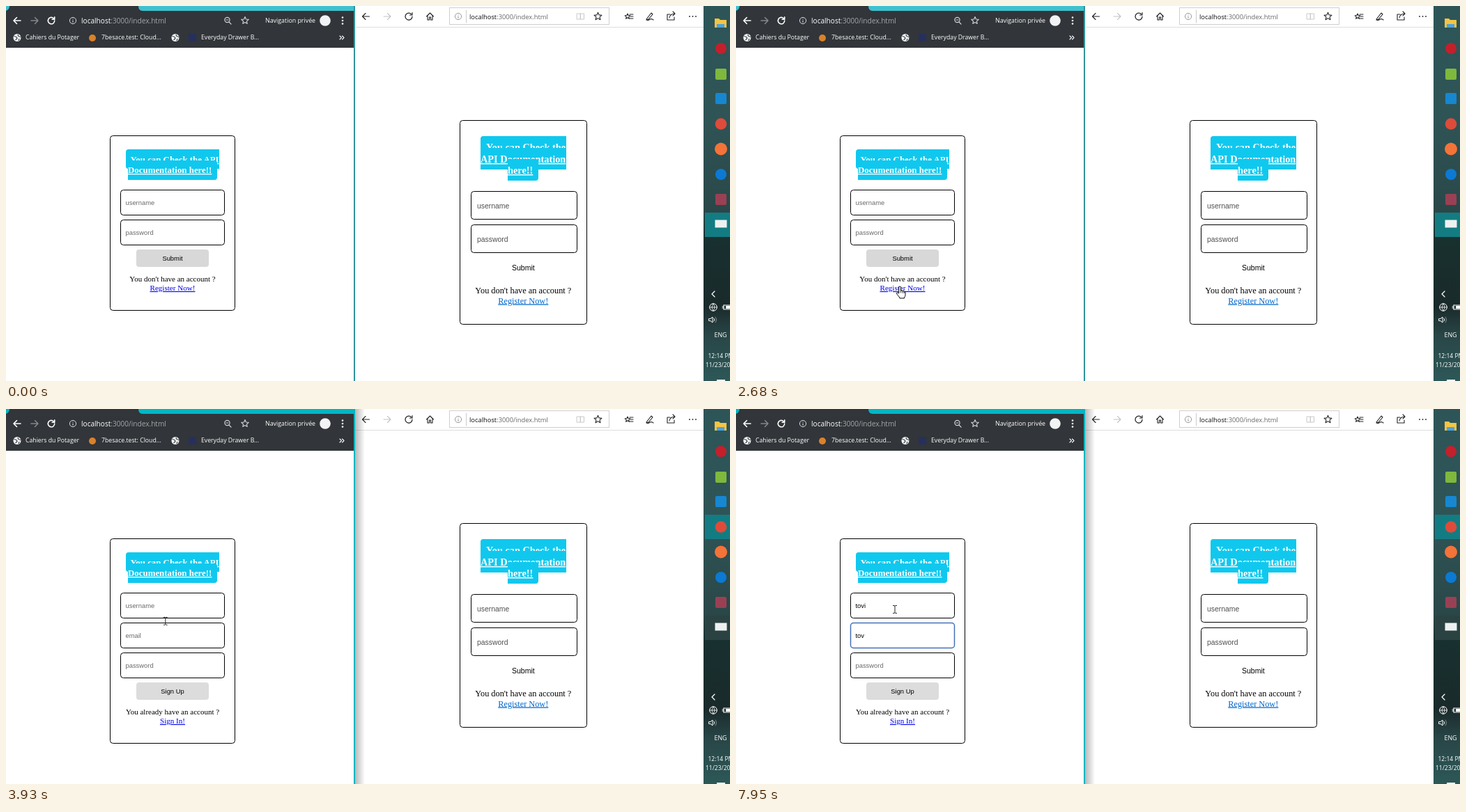
Write an HTML page that moves like this. It is 1039 px wide and 539 px high and loops after 8000 ms.

```html
<!DOCTYPE html>
<html lang="en">
<head>
<meta charset="utf-8">
<title>Sign-up form demo</title>
<style>
html, body { margin: 0; width: 100%; height: 100%; overflow: hidden; background: #fff; }
svg { display: block; width: 1039px; height: 539px; }
text { white-space: pre; }
.ui { font-family: "Open Sans", "Noto Sans", sans-serif; }
.sans { font-family: "Liberation Sans", Arial, sans-serif; }
.serif { font-family: "Liberation Serif", "Times New Roman", serif; }
.title { font-weight: bold; fill: #fff; text-decoration: underline; }
.link { text-decoration: underline; }
.mid { text-anchor: middle; }
.line { fill: none; stroke-linecap: round; stroke-linejoin: round; }
</style>
</head>
<body>
<svg id="stage" viewBox="0 0 1039 539"></svg>
<script>
const LOOP = 8000;
const USER = "tovi";
const CYAN = "#10c8ee";
const HINT = "#6a6a6a";

const text = (x, y, size, str, cls, fill = "#000", extra = "") =>
  `<text x="${x}" y="${y}" font-size="${size}" class="${cls}" fill="${fill}" ${extra}>${str}</text>`;
const rect = (x, y, w, h, fill, r = 0, extra = "") =>
  `<rect x="${x}" y="${y}" width="${w}" height="${h}" fill="${fill}" rx="${r}" ${extra}/>`;
const frame = (x, y, w, h, r = 4) => rect(x + .5, y + .5, w - 1, h - 1, "#fff", r, 'stroke="#000"');
const line = (d, color, w = 1.2) => `<path class="line" d="${d}" stroke="${color}" stroke-width="${w}"/>`;
const disc = (x, y, r, fill) => `<circle cx="${x}" cy="${y}" r="${r}" fill="${fill}"/>`;
const ring = (x, y, r, color, w = 1) => `<circle cx="${x}" cy="${y}" r="${r}" fill="none" stroke="${color}" stroke-width="${w}"/>`;
const group = (id, body) => `<g id="${id}">${body}</g>`;

// dir is 1 for forward, -1 for back
const arrow = (x, y, dir, color, w) =>
  line(`M${x - 5 * dir} ${y}h${10 * dir}m${-4.5 * dir} -4.5l${4.5 * dir} 4.5l${-4.5 * dir} 4.5`, color, w);
const reload = (x, y, r, color, w) => line(`M${x + r * .7} ${y - r * .7}A${r} ${r} 0 1 0 ${x + r} ${y}M${x + r} ${y - r - .5}v3.5h-3.5`, color, w);
const star = (x, y, r, color) => {
  const points = Array.from({ length: 10 }, (_, i) => {
    const a = i * Math.PI / 5 - Math.PI / 2, d = i % 2 ? r * .45 : r;
    return `${(x + d * Math.cos(a)).toFixed(1)} ${(y + d * Math.sin(a)).toFixed(1)}`;
  });
  return line(`M${points.join("L")}Z`, color, 1.1);
};
const info = (x, y, color) => ring(x, y, 4.6, color) + line(`M${x} ${y}v2.2M${x} ${y - 2.2}v.1`, color, 1.1);
const globe = (x, y) => disc(x, y, 5.5, "#f1f3f4") +
  line(`M${x - 4} ${y - 2}l3 1l1 2l-2 2M${x + 1} ${y - 4}l1 2l3 1M${x + 2} ${y + 4}l1 -2`, "#45484c", 1.3);
const address = (x, y, size, host, path) =>
  text(x, y, size, `localhost<tspan fill="${path}">:3000/index.html</tspan>`, "ui", host);

// Highlight behind one line of a wrapped link, rounded only at its outer ends
const highlight = (x, y, w, h, left, right) => {
  const l = left ? 4 : 0, r = right ? 4 : 0;
  return `<path fill="${CYAN}" d="M${x + l} ${y}H${x + w - r}q${r} 0 ${r} ${r}V${y + h - r}q0 ${r} ${-r} ${r}H${x + l}q${-l} 0 ${-l} ${-l}V${y + l}q0 ${-l} ${l} ${-l}Z"/>`;
};
const title = (x, y, size, str) => text(x, y, size, str, "serif title", "#fff");

// Left browser
const leftBrowser =
  rect(0, 0, 500, 60, "#323539") +
  `<path class="accent" d="M190 0H500V7H196Q190 7 190 0ZM0 0H5Q5 5 0 7Z"/>` +
  arrow(16, 21, -1, "#fff", 1.6) + arrow(41, 21, 1, "#85888b", 1.5) + reload(65, 21, 4.7, "#fff", 1.6) +
  info(96, 21, "#dcdee0") + address(108, 24.5, 10.1, "#fff", "#a5a8ab") +
  ring(317.5, 20, 3.6, "#d0d2d4", 1.2) + line("M320 23l3 3M316 20h3", "#d0d2d4") +
  star(343, 21, 5.5, "#d8dadc") +
  text(372, 24, 8.85, "Navigation privée", "ui", "#fff") + disc(458, 21, 7.8, "#f1f3f4") +
  [16.5, 21, 25.5].map(y => disc(483, y, 1.3, "#fff")).join("") +
  globe(16, 45.5) + text(28, 48.2, 8.7, "Cahiers du Potager", "ui", "#fff") +
  disc(124, 46, 5, "#d9822b") + text(137, 48.2, 8.7, "7besace.test: Cloud...", "ui", "#fff") +
  globe(243, 45.5) + rect(262, 40, 11, 11, "#26305c") + text(280, 48.2, 8.7, "Everyday Drawer B...", "ui", "#fff") +
  line("M479 43l2.5 2.5l-2.5 2.5M482.5 43l2.5 2.5l-2.5 2.5", "#fff", 1.1);

const leftTitle =
  highlight(172, 206, 134, 28, true, false) + title(178.5, 225, 12.85, "You can Check the API") +
  highlight(175, 222, 128, 28, false, true) + title(175, 240, 12.9, "Documentation here!!");

const field = (id, y, hint) =>
  group(id, frame(164, y, 150, 37) + text(171.5, y + 21.5, 9.4, hint, "sans", HINT) +
    `<path class="caret" stroke="#000" d="M0 ${y + 13}v11"/>`);
const button = (y, label, color) => rect(187, y, 104, 25, color, 4) + text(239, y + 16, 9.4, label, "sans mid");
const footer = (y, question, link) =>
  text(239, y, 11, question, "serif mid") + text(239, y + 13, 11.1, link, "serif mid link", "#0000ee");

const signIn = frame(149, 186, 180, 252) + leftTitle +
  field("loginUser", 264, "username") + field("loginPassword", 307, "password") +
  button(350, "Submit", "#d8d8d8") + footer(396, "You don't have an account ?", "Register Now!");
const signUp = frame(149, 186, 180, 295) + leftTitle +
  field("newUser", 264, "username") + field("newEmail", 307, "email") + field("newPassword", 350, "password") +
  button(393, "Sign Up", "#dcdcdc") + footer(439, "You already have an account ?", "Sign In!");

// Right browser
const rightBrowser =
  arrow(516.5, 15, -1, "#222", 1.1) + arrow(547, 15, 1, "#c4c4c4", 1.1) + reload(578, 15, 5, "#222", 1.2) +
  line("M603.5 15l5 -5l5 5M605 14v6h2.5v-4h2v4h2.5v-6", "#222", 1.1) +
  rect(636.5, 2.5, 229, 24, "#fff", 0, 'stroke="#cfcfcf"') + info(649, 15, "#999") + line("M660.5 6v18", "#ccc", 1) +
  address(665, 18.5, 9.35, "#111", "#666") +
  line("M819.5 11h5v8h-5zM824.5 11h5v8h-5z", "#c8c8c8", 1) + star(849.5, 15, 5.8, "#222") +
  star(892, 15, 4, "#222") + line("M895 12h5M896 15h4M895 18h5", "#222", 1.1) +
  line("M919 19l7 -9l2 2l-6 7l-3 1q3 1 5 -1q3 -1 5 1", "#222", 1.1) +
  line("M953 12h-4v8h10v-4M952 17q1 -6 8 -6m-3 -3l3 3l-3 3", "#222", 1.1) +
  [981, 985.5, 990].map(x => disc(x, 15, .9, "#222")).join("") +
  line("M502 30.5H1001", "#dedede", 1) +
  frame(651, 164, 183, 294) +
  highlight(681, 187, 123, 31, true, false) + title(689, 208, 14.3, "You can Check the") +
  highlight(681, 204, 123, 31, false, false) + title(681, 225, 14.35, "API Documentation") +
  highlight(720, 220, 44, 31, false, true) + title(720, 241, 14.35, "here!!") +
  [["username", 266], ["password", 314]].map(([hint, y]) =>
    frame(667, y, 153, 41) + text(676, y + 24.5, 10.4, hint, "sans", "#505050")).join("") +
  text(742.3, 380, 10.5, "Submit", "sans mid") +
  text(742.3, 413, 12.3, "You don't have an account ?", "serif mid") +
  text(742.3, 427.5, 12.3, "Register Now!", "serif mid link", "#0066cc");

// Taskbar
const tile = (y, fill) => rect(1018, y - 8, 16, 16, fill, 2);
const taskbar =
  rect(1001, 0, 38, 539, "url(#bar)") + rect(1003, 297, 36, 35, "#2b4243") +
  '<rect id="active" x="1003" width="36" height="35" fill="#137c82"/>' +
  `<path fill="#f5c444" d="M1017 18h6l2 2h9v11h-17z"/>` + rect(1020, 26, 11, 5, "#4aa3dd") +
  disc(1026, 61, 8, "#c3202c") + tile(98, "#7fb83c") + tile(133, "#1687d0") + disc(1026, 169.5, 8.3, "#df4b3a") +
  disc(1026, 205.5, 9, "#f47338") + disc(1026, 242, 8, "#0c79d2") + tile(278, "#9a4054") +
  rect(1017.5, 307.5, 17, 11, "#eef1f1") +
  line("M1017 410l-4 4l4 4", "#fff") +
  ring(1015, 433, 5.3, "#fff") + line("M1010 433h10M1015 428q-4 5 0 10M1015 428q4 5 0 10", "#fff", .8) +
  line("M1030 430h9M1030 436h9M1030 430v6M1028 432h2M1028 434h2", "#fff", 1) + rect(1033, 431, 6, 4, "#fff") +
  line("M1009 449.5h2l3 -2.5v8l-3 -2.5h-2zM1016 449q2 2 0 4", "#fff", 1) + line("M1018 447q3 4 0 8", "#819091", 1) +
  text(1016.5, 476, 8.8, "ENG", "ui", "#fff") + text(1007.5, 505.5, 8.5, "12:14 PM", "ui", "#fff") +
  text(1004, 518.5, 8.5, "11/23/2019", "ui", "#fff") + rect(1020, 537, 12, 2, "#fff");

// Pointers, hot spot near 0,0
const pointers = {
  arrow: `<path fill="#fff" stroke="#000" d="M.5 .5v14l3.2 -3l2.2 5.3l2.3 -1l-2.2 -5h4.3z"/>`,
  resize: `<path fill="#fff" stroke="#000" d="M-8.5 0l4.5 -4v2.8h8v-2.8l4.5 4l-4.5 4v-2.8h-8v2.8z"/>`,
  hand: `<path fill="#fff" stroke="#000" stroke-linejoin="round" d="M-2.7 2v-8.5q0 -1.5 1.4 -1.5t1.4 1.5v4.5q2.2 -.8 2.5 .7q1.9 -.5 2.1 .8q1.8 -.2 1.8 1.5v3.5q0 2 -1.5 3.5v1h-6.5q-.5 -2 -3 -4.5q-2 -2.2 -1.5 -3q1.2 -1.2 3.3 .5z"/><path class="line" stroke="#000" stroke-width=".8" d="M.1 -2v3M2.6 -1.3v2.6M4.7 -.5v2"/>`,
  ibeam: line("M-2.5 -5.5h1.7l.8 .8l.8 -.8h1.7M0 -4.7v9.4M-2.5 5.5h1.7l.8 -.8l.8 .8h1.7", "#222", 1)
};

const stage = document.getElementById("stage");
stage.innerHTML =
  `<defs>
    <linearGradient id="bar" x2="0" y2="1">
      <stop stop-color="#2d5558"/><stop offset=".3" stop-color="#2f5456"/><stop offset=".55" stop-color="#2a4748"/>
      <stop offset=".62" stop-color="#18302f"/><stop offset=".8" stop-color="#1a2a2b"/>
      <stop offset=".88" stop-color="#294647"/><stop offset="1" stop-color="#2d5858"/>
    </linearGradient>
    <linearGradient id="shade"><stop stop-opacity=".28"/><stop offset="1" stop-opacity="0"/></linearGradient>
  </defs>` +
  rect(0, 0, 1039, 539, "#fff") + leftBrowser + group("signIn", signIn) + group("signUp", signUp) + rightBrowser +
  group("shadow", rect(501, 0, 14, 539, "url(#shade)")) +
  `<rect id="divider" x="499" width="2" height="539"/>` + taskbar +
  group("pointer", Object.entries(pointers).map(([id, art]) => group(id, art)).join(""));

const el = id => document.getElementById(id);
const show = (node, on) => node.setAttribute("visibility", on ? "inherit" : "hidden");

// [start, end, steps, shape, from x, from y, to x, to y]
const moves = [
  [440, 900, 7, "arrow", 783, 535, 540, 478],
  [980, 980, 1, "resize", 496, 467, 496, 467],
  [1100, 1230, 3, "arrow", 410, 445, 305, 418],
  [1300, 1450, 3, "hand", 262, 411, 223, 411],
  [1680, 1760, 2, "hand", 226, 411, 228, 411],
  [1910, 2300, 6, "hand", 229, 411, 236.5, 411],
  [3380, 3460, 2, "hand", 235, 405, 234, 398],
  [3540, 3940, 6, "ibeam", 232, 372, 228, 288]
];

function drawPointer(t) {
  const move = moves.findLast(m => m[0] <= t);
  show(el("pointer"), move);
  if (!move) return;
  const [start, end, steps, shape, x0, y0, x1, y1] = move;
  const last = steps - 1;
  const p = last ? Math.min(last, Math.floor((t - start) / (end - start) * last + 1e-6)) / last : 0;
  el("pointer").setAttribute("transform", `translate(${x0 + (x1 - x0) * p} ${y0 + (y1 - y0) * p})`);
  for (const id in pointers) show(el(id), id === shape);
}

function drawField(id, hint, t, focus, blur, keys) {
  const [box, label, caret] = el(id).children;
  const typed = USER.slice(0, keys.filter(k => k <= t).length);
  const focused = t >= focus && t < blur;
  const lastInput = keys.findLast(k => k <= t) ?? focus;
  label.textContent = typed || hint;
  label.setAttribute("fill", typed ? "#000" : HINT);
  box.setAttribute("stroke", focused ? "#4470b8" : "#000");
  box.setAttribute("stroke-width", focused ? 1.5 : 1);
  show(caret, focused && (t - lastInput) % 1060 < 530);
  const x = Math.round(171.5 + (typed ? label.getComputedTextLength() : 0)) + .5;
  caret.setAttribute("transform", `translate(${x} 0)`);
}

for (const id of ["loginUser", "loginPassword", "newPassword"]) show(el(id).children[2], false);

function draw(now) {
  const t = now % LOOP;
  const active = t >= 2760, registering = t >= 2910;
  show(el("signIn"), !registering);
  show(el("signUp"), registering);
  show(el("shadow"), active);
  el("divider").setAttribute("fill", active ? "#00b5c1" : "#32939a");
  document.querySelector(".accent").setAttribute("fill", active ? "#00b7c6" : "#3fc1cf");
  el("active").setAttribute("y", active ? 152 : 297);
  drawField("newUser", "username", t, 4020, 6330, [5010, 5240, 5390, 5540]);
  drawField("newEmail", "email", t, 6330, LOOP, [7040, 7190, 7420]);
  drawPointer(t);
  requestAnimationFrame(draw);
}
requestAnimationFrame(draw);
</script>
</body>
</html>
```
